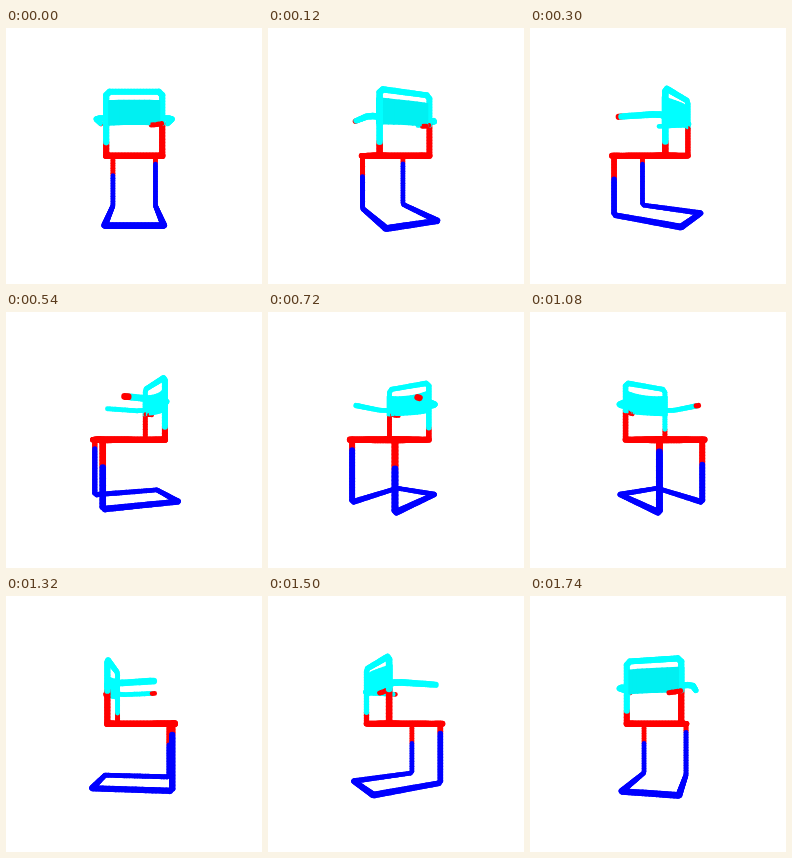
These frames come from a looping animation (256 px wide and 256 px high, 1.8 s). An HTML page with a canvas:

```html
<!DOCTYPE html>
<html>
<head>
<meta charset="utf-8">
<title>Turning chair</title>
<style>
html, body { margin: 0; width: 100%; height: 100%; overflow: hidden; background: #fff; }
canvas { display: block; }
</style>
</head>
<body>
<canvas id="stage" width="256" height="256"></canvas>
<script>
const ctx = document.getElementById('stage').getContext('2d');
const CYAN = '#0ff', RED = '#f00', BLUE = '#00f', SHADE = '#00f0f2';
const STEP = 60, STEPS = 30, EYE = 215;
const parts = [];

// Points are [x, height above the seat, z toward the back].
function tube(color, width, ...pts) {
  for (let i = 1; i < pts.length; i++) {
    const a = pts[i - 1], b = pts[i];
    const n = Math.ceil(Math.hypot(...a.map((v, j) => b[j] - v)) / 3);
    const at = t => a.map((v, j) => v + (b[j] - v) * t);
    for (let k = 0; k < n; k++) parts.push({ color, width, pts: [at(k / n), at((k + 1) / n)] });
  }
}

const W = 24.8, FRONT = -35.8, BACK = 21.5, REAR = 35.8, FLOOR = -58.3;
const THICK = 5.5, SEAT = 5.8;

function buildSide(s, legSplit, postSplit, tipColor) {
  const x = s * W, post = s * 25.2;
  tube(RED, THICK, [x, 0, FRONT], [x, -legSplit, FRONT]);
  tube(BLUE, THICK, [x, -legSplit, FRONT], [x, FLOOR + 2, FRONT], [x, FLOOR, FRONT + 2],
    [x, FLOOR, REAR - 1], [x - s, FLOOR, REAR], [0, FLOOR, REAR]);
  tube(RED, SEAT, [0, 0, FRONT - 2], [s * 25.5, 0, FRONT - 2], [post, 0, BACK], [0, 0, BACK]);
  tube(RED, THICK, [post, 0, BACK], [post, postSplit, BACK]);
  tube(CYAN, THICK, [post, postSplit, BACK], [post, 54.5, BACK], [post - s * 3, 57.5, BACK], [0, 57.5, BACK]);
  tube(CYAN, THICK, [post, 33.5, BACK], [s * 31, 34, 20], [s * 35, 34, 15], [s * 36.4, 35, -17]);
  tube(tipColor, THICK, [s * 36.4, 35, -17], [s * 36.4, 35, -20]);
}

buildSide(-1, 23.3, 12, RED);
buildSide(1, 9.8, 29.5, CYAN);
tube(RED, 4.4, [W, 29, BACK], [20, 27.7, 24], [15, 27, 25.5]);

// Curved back panel as upright strips.
const bulge = x => 20 + 7 * (1 - (x / 27) ** 2);
const rim = x => 48 + 1.5 * (x / 27) ** 2;
for (let x = -27; x < 27; x += 4.5) {
  const r = x + 4.5;
  parts.push({
    panel: true, width: 1.8,
    pts: [[x, 27.8, bulge(x)], [x, rim(x), bulge(x)], [r, rim(r), bulge(r)], [r, 27.8, bulge(r)]]
  });
}

function draw(angle) {
  const c = Math.cos(angle), s = Math.sin(angle);
  const project = ([x, y, z]) => {
    const depth = z * c - x * s, k = EYE / (EYE - depth);
    return { x: 128.2 + (x * c + z * s) * k, y: 127.7 - y * k, k, depth };
  };
  const mean = (pts, key) => pts.reduce((sum, p) => sum + p[key], 0) / pts.length;
  const items = parts.map(part => {
    const pts = part.pts.map(project);
    return { ...part, pts, depth: mean(pts, 'depth') };
  }).sort((a, b) => a.depth - b.depth);

  ctx.fillStyle = '#fff';
  ctx.fillRect(0, 0, 256, 256);
  ctx.lineCap = ctx.lineJoin = 'round';
  for (const { pts, color, width, panel } of items) {
    ctx.strokeStyle = ctx.fillStyle = panel ? (c > 0.8 ? SHADE : CYAN) : color;
    ctx.lineWidth = width * mean(pts, 'k');
    ctx.beginPath();
    for (const p of pts) ctx.lineTo(p.x, p.y);
    if (panel) {
      ctx.closePath();
      ctx.fill();
    }
    ctx.stroke();
  }
}

const start = performance.now();
function tick() {
  const step = Math.floor((performance.now() - start) / STEP) % STEPS;
  draw(step * 2 * Math.PI / STEPS);
  requestAnimationFrame(tick);
}
tick();
</script>
</body>
</html>
```
